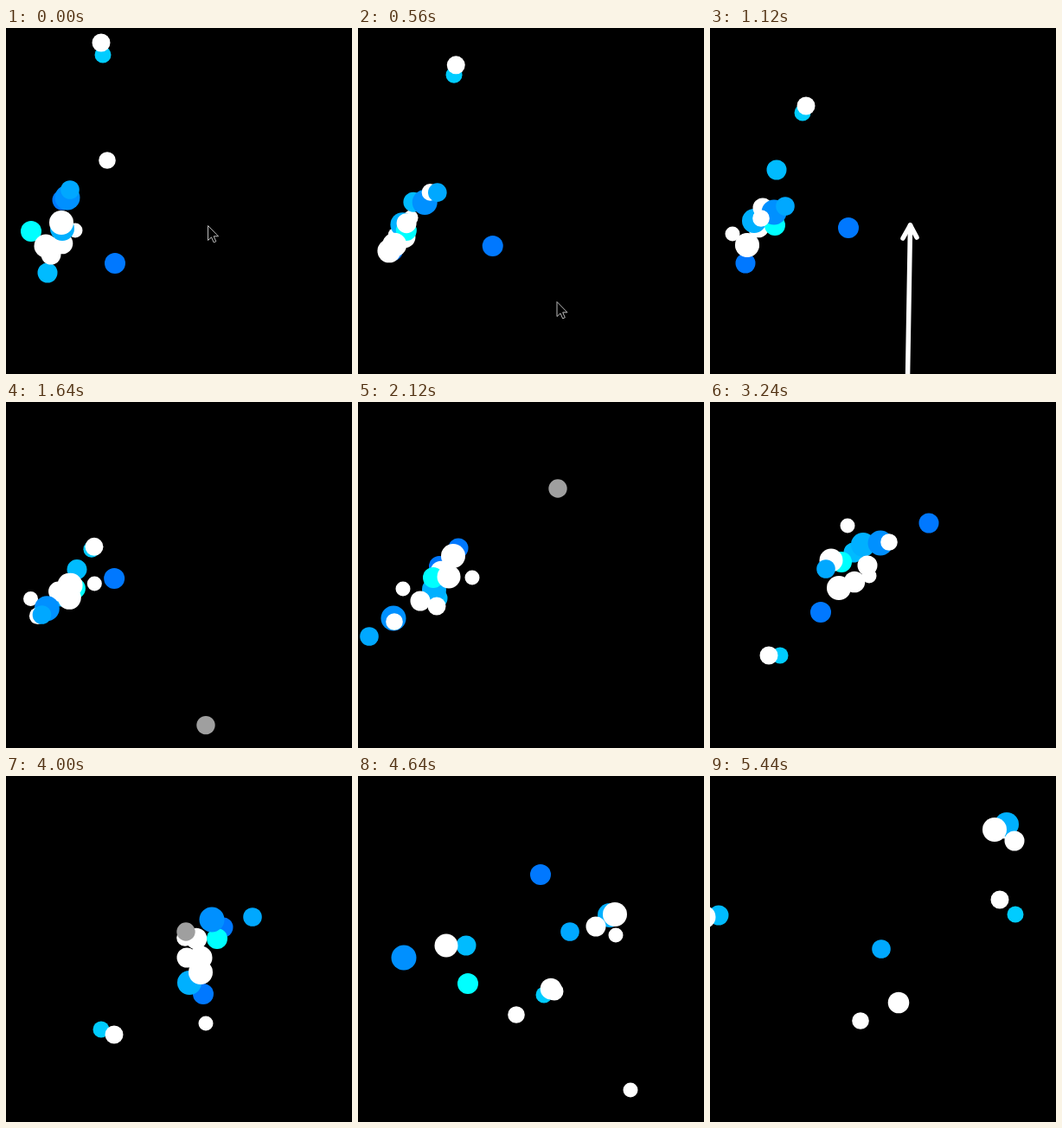
Animation, 400 px wide and 400 px high, one loop 5.48 s. Source, as an HTML page:

```html
<!DOCTYPE html>
<html lang="en">
<head>
<meta charset="utf-8">
<title>Swarm</title>
<style>
  html, body { margin: 0; width: 100%; height: 100%; overflow: hidden; background: #000; }
  svg { display: block; width: 100vw; height: 100vh; }
</style>
</head>
<body>
<svg id="stage" viewBox="0 0 400 400">
  <g id="swarm"></g>
  <g id="arrow" fill="none" stroke="#fff" stroke-width="5.5" stroke-linecap="round" stroke-linejoin="round">
    <path id="shaft"/>
    <path id="head" d="M-8.5 15 L0 0 L7.5 14"/>
  </g>
  <circle id="probe" r="10.7" fill="#9f9f9f"/>
  <path id="cursor" d="M0 0 V17 L4 13.4 L6.7 19.4 L9.3 18.2 L6.7 12.3 H12 Z" fill="#000" stroke="#bbb" stroke-width="1"/>
</svg>
<script>
const LOOP = 5480, STEP = 40;
const TIMES = [0, 1120, 2120, 3240, 4000, 4640, 5440];
const BURST = 4; // from this key on the balls fly straight
const PROBE_SPEED = 0.57;
const $ = id => document.getElementById(id);
const balls = [];

// Every path is a list of waypoints, one for each key time.
function ball(fill, r, path) {
  const node = document.createElementNS("http://www.w3.org/2000/svg", "circle");
  node.setAttribute("r", r);
  node.setAttribute("fill", fill);
  $("swarm").append(node);
  const points = path.split(" ").map(p => p.split(",").map(Number));
  balls.push({ node, axes: [0, 1].map(k => points.map(p => p[k])) });
}

ball("#fff", 8.5, "64,228 72,212 132,203 159,143 225,215 298,184 340,64");
ball("#0078ff", 11.5, "65,199 41,272 116,169 253,140 251,175 230,-30 200,-280");
ball("#0078ff", 12, "126,272 160,231 94,190 128,243 228,252 211,114 193,-78");
ball("#00ccff", 9.5, "112,31 107,98 91,235 81,293 110,293 215,253 353,160");
ball("#fff", 12.3, "65,249 56,230 96,196 167,208 220,188 223,246 218,262");
ball("#fff", 8.5, "80,234 26,238 52,216 184,201 231,286 315,363 409,449");
ball("#00bbff", 11.5, "48,283 77,164 92,227 166,174 222,215 125,196 10,161");
ball("#00b0ff", 14, "65,232 51,223 88,217 177,165 212,239 291,161 343,56");
ball("#00ffff", 12, "29,235 75,228 87,203 152,185 244,188 127,240 -19,304");
ball("#fff", 11.5, "52,262 61,208 72,230 182,189 209,210 275,174 352,75");
ball("#0090ff", 14.5, "71,196 74,213 41,250 197,163 238,166 53,210 -180,265");
ball("#fff", 13.5, "46,252 43,251 105,202 140,183 225,210 102,196 -7,163");
ball("#fff", 14, "64,225 43,251 110,178 149,215 225,227 297,160 329,62");
ball("#fff", 9.8, "117,153 59,220 42,254 207,162 207,187 183,276 174,283");
ball("#00a8ff", 10.8, "74,187 87,206 13,271 134,193 285,163 245,180 198,200");
ball("#fff", 10.5, "110,17 111,90 91,236 68,293 125,299 227,249 335,143");

const secant = (v, a, b) => (v[b] - v[a]) / (TIMES[b] - TIMES[a]);

function slope(v, i) {
  if (i === 0) return 2 * secant(v, 0, 1) - secant(v, 0, 2);
  if (i === BURST) return secant(v, i - 1, i);
  return secant(v, i - 1, i + 1);
}

function along(v, t) {
  let i = 0;
  while (i < TIMES.length - 2 && t >= TIMES[i + 1]) i++;
  const span = TIMES[i + 1] - TIMES[i];
  const s = (t - TIMES[i]) / span;
  if (i >= BURST) return v[i] + (v[i + 1] - v[i]) * s;
  const ease = s * s * (3 - 2 * s);
  const bend = s * (1 - s) * ((1 - s) * slope(v, i) - s * slope(v, i + 1));
  return v[i] + (v[i + 1] - v[i]) * ease + span * bend;
}

function place(node, x, y) {
  node.setAttribute("transform", `translate(${x.toFixed(2)} ${y.toFixed(2)})`);
}

function show(node, on) {
  node.setAttribute("visibility", on ? "visible" : "hidden");
}

function render(t) {
  for (const { node, axes } of balls) place(node, along(axes[0], t), along(axes[1], t));

  // The pointer slides down out of the stage.
  const fall = (t / 560) ** 2;
  place($("cursor"), 233.5 - 3.5 * fall, 228.5 + 88 * fall);
  show($("cursor"), t < 840);

  // The arrow grows upwards along nearly the same line.
  const grow = Math.min(1, Math.max(0, (t - 840) / 240));
  const tipX = 228.5 + 3 * grow, tipY = 404 - 176 * grow;
  $("shaft").setAttribute("d", `M228.5 404 L${tipX} ${tipY}`);
  place($("head"), tipX, tipY);
  show($("arrow"), t >= 840 && t < 1560);

  // Two upward passes of the grey disc, the second one through the swarm.
  const second = t > 3000;
  const y = second ? 180 - PROBE_SPEED * (t - 4000) : 100 - PROBE_SPEED * (t - 2120);
  place($("probe"), second ? 208 : 231, y);
}

const start = performance.now();
function tick() {
  const t = (performance.now() - start) % LOOP;
  render(Math.floor(t / STEP) * STEP);
  requestAnimationFrame(tick);
}
tick();
</script>
</body>
</html>
```
